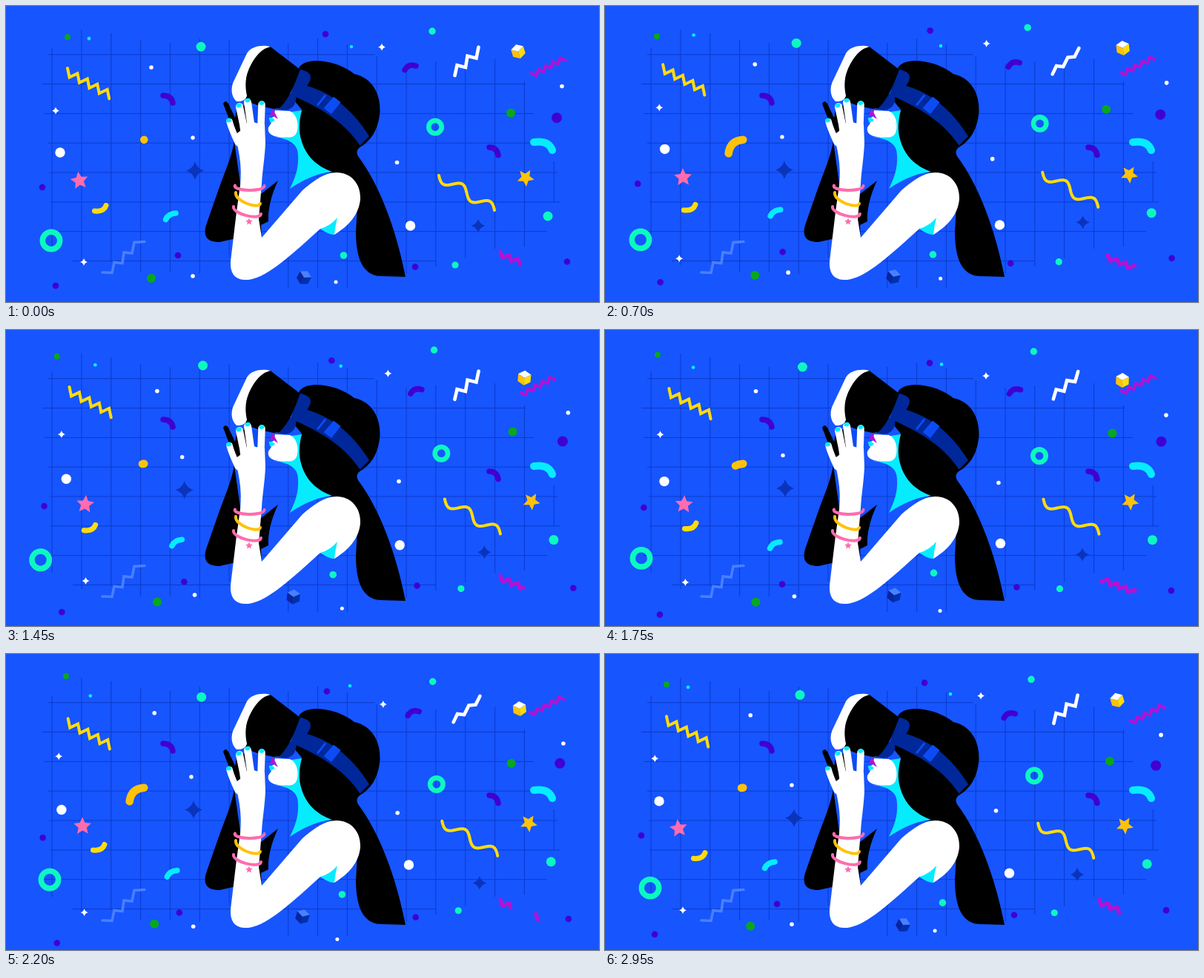
These frames come from a looping animation (800 px wide and 400 px high, 3 s). An HTML page with a canvas:

```html
<!DOCTYPE html>
<html lang="en">
<head>
<meta charset="utf-8">
<title>Headset and confetti</title>
<style>
html, body { margin: 0; width: 100%; height: 100%; overflow: hidden; background: #1755ff; }
canvas { display: block; width: 800px; height: 400px; }
</style>
</head>
<body>
<canvas id="stage" width="800" height="400"></canvas>
<script>
const ctx = document.getElementById('stage').getContext('2d');
const LOOP = 3000, STEP = 50;
const C = {
  bg: '#1755ff', line: '#0b3bcb', navy: '#00289a', deep: '#0a34bb', soft: '#4a80ff', clasp: '#0d4cf5',
  purple: '#4000cf', teal: '#0cf8c0', green: '#08a81c', cyan: '#06ecff', pink: '#ff6cae',
  yellow: '#ffdc0c', orange: '#ffc20a', magenta: '#b412d2', white: '#fff', black: '#000'
};

// Each drift: straight to the first point, a cubic curve to the last, straight home.
const DRIFT = {
  A: [[-14, -1.2], [-14.6, -4], [-12, -8.6], [-.3, -12.4]],
  B: [[-5.2, -5.2], [0, -7], [3.4, -5], [0, 4.6]],
  C: [[6.7, -4.6], [7.5, -1.8], [7.5, -.3], [3.6, -3.9]],
  D: [[8.2, -5], [8.6, -.1], [7, 6.6], [1, 13.3]]
};
const NODES = [0, 4 / 15, 2 / 3, 1];

function drift(type, t) {
  const pts = DRIFT[type];
  if (t < 750) return pts[0].map(v => v * t / 750);
  if (t > 2250) return pts[3].map(v => v * (LOOP - t) / 750);
  const u = (t - 750) / 1500;
  const w = NODES.map((a, i) =>
    NODES.reduce((p, b, j) => i === j ? p : p * (u - b) / (a - b), 1));
  return [0, 1].map(k => pts.reduce((s, p, i) => s + p[k] * w[i], 0));
}

const pulse = t => 1 - Math.abs(t % 1500 - 750) / 750;
const mix = (a, b, k) => a + (b - a) * k;

function knots(times, vals, t) {
  let i = 1;
  while (t > times[i]) i++;
  return mix(vals[i - 1], vals[i], (t - times[i - 1]) / (times[i] - times[i - 1]));
}

function fill(d, color) {
  ctx.fillStyle = color;
  ctx.fill(new Path2D(d));
}

function stroke(d, color, width, join = 'miter') {
  ctx.strokeStyle = color;
  ctx.lineWidth = width;
  ctx.lineCap = 'round';
  ctx.lineJoin = join;
  ctx.stroke(new Path2D(d));
}

function dot(x, y, r, color) {
  ctx.fillStyle = color;
  ctx.beginPath();
  ctx.arc(x, y, r, 0, 7);
  ctx.fill();
}

function ring(x, y, r, width) {
  ctx.strokeStyle = C.teal;
  ctx.lineWidth = width;
  ctx.beginPath();
  ctx.arc(x, y, r, 0, 7);
  ctx.stroke();
}

function star(x, y, r, color, turn = 0) {
  ctx.fillStyle = color;
  ctx.beginPath();
  for (let i = 0; i < 10; i++) {
    const a = turn + i * Math.PI / 5 - Math.PI / 2, q = i % 2 ? r * .47 : r;
    ctx.lineTo(x + q * Math.cos(a), y + q * Math.sin(a));
  }
  ctx.fill();
}

function spark(x, y, r, color) {
  const k = r * .24;
  fill(`M${x} ${y - r}Q${x + k} ${y - k} ${x + r} ${y}Q${x + k} ${y + k} ${x} ${y + r}` +
    `Q${x - k} ${y + k} ${x - r} ${y}Q${x - k} ${y - k} ${x} ${y - r}Z`, color);
}

function cube(x, y, turn, faces) {
  const r = 10, at = i => `${r * Math.sin(i * Math.PI / 3)} ${-r * Math.cos(i * Math.PI / 3)}`;
  ctx.save();
  ctx.translate(x, y);
  ctx.rotate(turn);
  faces.forEach((color, i) => {
    const n = 2 * i - 1;
    fill(`M0 0L${at(n)}L${at(n + 1)}L${at(n + 2)}Z`, color);
  });
  ctx.restore();
}

const polyline = pts => 'M' + pts.map(p => p.join(' ')).join('L');

function zigzag(x, y, a, b, count) {
  let d = `M${x} ${y}`;
  for (let i = 0; i < count; i++) d += 'l' + (i % 2 ? b : a).join(' ');
  return d;
}

function wave(x, y, dx, dy, amp, turns) {
  const n = 48, len = Math.hypot(dx, dy), pts = [];
  for (let i = 0; i <= n; i++) {
    const u = i / n, q = amp * Math.sin(u * turns * 2 * Math.PI) / len;
    pts.push([x + dx * u - dy * q, y + dy * u + dx * q]);
  }
  return polyline(pts);
}

const DOTS = {
  A: [[83, 42, 4, 'green'], [252, 178, 2.7, 'white'], [466, 55, 2.3, 'cyan'],
    [545.5, 297, 6.7, 'white'], [455.5, 337, 4.8, 'teal']],
  B: [[263, 55, 6.5, 'teal'], [49, 245, 4.3, 'purple'], [252, 365, 2.8, 'white'],
    [575, 34, 4.7, 'teal'], [681, 144.5, 6, 'green'], [527.5, 211.5, 2.8, 'white'],
    [552, 352.5, 4.3, 'purple']],
  C: [[196, 83, 2.8, 'white'], [196, 368, 6, 'green'], [743, 151, 7, 'purple'],
    [731, 284, 6.5, 'teal'], [606, 350, 4.6, 'teal']],
  D: [[112, 44, 2.4, 'cyan'], [73, 198, 6.7, 'white'], [232, 337, 4.3, 'purple'],
    [67, 378, 4.3, 'purple'], [431, 38, 4.3, 'purple'], [750, 108.5, 2.8, 'white'],
    [757, 345.5, 4.3, 'purple'], [445, 373, 2.5, 'white']]
};

const GROUPS = {
  A(t) {
    spark(255, 222.5, 12, C.deep);
    ring(61, 317, 11.7, 7.5);
    stroke('M119.5 277Q132 278.5 135 269.5', C.yellow, 7);
    stroke(zigzag(708.5, 91, [7, 3], [2.8, -8.2], 9), C.magenta, 4, 'round');
    cube(402, 367, .5 - .4 * pulse(t / 2), [C.soft, '#0031ad', '#0a249c']);
  },
  B() {
    stroke(zigzag(83, 84, [2.6, 12.4], [10.8, -5.2], 9), C.yellow, 4);
    spark(105, 346, 5, C.white);
  },
  C(t) {
    spark(67, 141.5, 5, C.white);
    star(99, 236, 12.5, C.pink, -.15 + .25 * pulse(t / 2));
    star(701, 232, 12, C.orange, .55);
    stroke('M538 86.5Q543 77.5 553 81', C.purple, 7.5);
    stroke(wave(584, 229, 75, 47, 7, 2), C.yellow, 4, 'round');
  },
  D(t) {
    stroke('M215.5 288.5Q219 280.5 229 280', C.cyan, 7.5);
    spark(507, 55.5, 5, C.white);
    spark(637, 297, 9.2, C.deep);
    ring(579, 163.5, 8.7, 6.6);
    cube(691, 61.5, -.3 + .4 * pulse(t / 2), [C.white, C.yellow, C.orange]);
  }
};

function grid() {
  const rows = [[57, 497], [49, 701], [52, 712], [57, 730], [59, 744], [60, 747], [51, 730], [90, 580]];
  const cols = [[56, 328], [32, 350], [37, 346], [46, 360], [50, 360], [44, 362], [46, 340], [60, 360],
    [50, 381], [44, 381], [52, 381], [68, 366], [78, 362], [75, 352], [82, 341], [72, 328], [102, 325], [210, 265]];
  const gap = 39.83;
  ctx.strokeStyle = C.line;
  ctx.lineWidth = 1;
  ctx.lineCap = 'butt';
  ctx.beginPath();
  rows.forEach(([a, b], i) => {
    const y = 65.7 + i * gap;
    ctx.moveTo(a, y);
    ctx.lineTo(b, y);
  });
  cols.forEach(([a, b], i) => {
    const x = 62.1 + i * gap;
    ctx.moveTo(x, a);
    ctx.lineTo(x, b);
  });
  ctx.stroke();
}

const SHARP = [[605.5, 94], [608.5, 80], [620, 83], [622.5, 67.5], [634.5, 70.5], [637.5, 55.5]];
const LOOSE = [[603.5, 92], [609, 81], [618, 82], [624.5, 69.5], [633.5, 68.5], [639.5, 57]];

function still(t) {
  const k = pulse(t);
  stroke('M130 360L143 360.5L146 346.5L157 347.5L159 333L170 334L173 319.5L187 318.5', C.soft, 3.5);
  stroke('M212 121Q223 121 225 131', C.purple, 7.5);
  stroke('M652 191Q662 191 664 201.5', C.purple, 7.5);
  stroke('M712 184Q732 181 737 195', C.cyan, 10);
  stroke(polyline(SHARP.map((p, i) => p.map((v, j) => mix(v, LOOSE[i][j], k)))), C.white, 4.6);

  ctx.save();
  ctx.setLineDash([32 * k + .05, 99]);
  stroke('M186.3 180.7Q167.5 182 166.5 201.5', C.orange, 10.5);
  const times = [0, 700, 1150, 1750, 2200, 2600, 2950, 3000];
  const from = knots(times, [0, .2, .9, 1.1, 1.9, 2.32, 3, 3], t);
  const to = knots(times, [.55, .9, 1.3, 1.92, 2.3, 3, 3.57, 3.55], t);
  const a = [2.6, 8.2], b = [9.3, -3.5];
  const len = 5 * Math.hypot(...a) + 4 * Math.hypot(...b);
  ctx.setLineDash([(to - from) * len, (1 - to + from) * len]);
  ctx.lineDashOffset = -(from % 1) * len;
  stroke(zigzag(667, 332, a, b, 9), C.magenta, 5, 'round');
  ctx.restore();
}

function woman() {
  // hair
  fill('M308 183C304 205 296 222 286 250L270 296C266 310 270 319 288 319L306 315L345 318' +
    'L344 296L354 291C353 275 358 255 367 236L344 254L316 240Z', C.black);
  fill('M396 82C403 74 418 73 430 75C448 78 460 84 470 92C494 97 505 118 504.5 142' +
    'C503 160 498 176 482 188C473 193 472 197 475 203C504 242 526 300 539 366L505 365' +
    'C482 364 472 342 472 305L474 270L440 226L400 210L394 160L399 140L384 122Z', C.black);

  // neck and face
  fill('M385 143L399 141C395 156 395 170 398 180C404 203 420 217 440 224C420 226 402 234 383 247' +
    'C390 232 395 220 394 202C394 188 385 180 362 177L388 176C396 168 394 152 385 143Z', C.cyan);
  fill('M363 141L383 142C392 146 395 158 393 168C391 177 386 178 374 177.5C362 177 352 174 354 164' +
    'L358 158L355 152L361 150Z', C.white);
  fill('M360 139L367 153L361 149L356 148Z', C.magenta);
  fill('M355 151Q359 150 363 154Q360 158 356 157Z', C.cyan);

  // headset and strap
  fill('M391 117C393 130 389 139 376 141L366 139L376 121Z', C.navy);
  fill('M356 54.5L397 86L386 113Q379 128 369 138L361 139L342 135L323 128L316 100L335 60Z', C.black);
  fill('M397 85.5C407 88 411 92 411 96C411 102 408 104 406.5 108C441 118 469 142 490 176' +
    'L477.5 188.5C459 160 429 139 384 120Z', C.navy);
  fill('M428.5 138L442 122.500L451.500 130L439 146Z', C.clasp);
  fill('M419 133.5L430 119.5L432.5 121L421.3 135Z', C.clasp);
  fill('M357 55C342 58 333 73 327 87C322 99 323 112 325 121C324 127 318 129.5 311 129' +
    'C303 122 303 109 308 100L325 64C331 54 346 52 357 55Z', C.white);

  // far hand
  fill('M293 132Q296 126 300 132L309 151L312 136L330 133L330 165L312 182Z', C.black);
  fill('M333 136L341 136L341 160L333 160Z', C.clasp);

  // arm
  fill('M309 174C313 192 319 213 316 242L311 278L303 345C302 365 312 371 327 370C349 367 374 347 424 301' +
    'L443 309C461 298 476 283 478 261C479 240 465 225 446 225C429 225 414 237 400 249' +
    'L345 313L341 288L345 240C346 222 349 206 350 185L349 160L337 158L328 154L317 168Z', C.white);
  fill('M424 301Q438 297 447 286Q444 298 443 309Q437 310 424 301Z', C.cyan);
  stroke('M301.5 156Q304 166 313 185', C.white, 8.5);
  stroke('M315 136L320 160L323 182', C.white, 10);
  stroke('M326 130L330 158L333 180', C.white, 10);
  stroke('M345 133L344 160L344 182', C.white, 9.5);
  for (const [x, y] of [[300.5, 154.5], [314, 134.5], [326, 127.5], [345, 131]]) {
    ctx.fillStyle = C.cyan;
    ctx.beginPath();
    ctx.ellipse(x, y, 3.6, 2.9, -.2, 0, 7);
    ctx.fill();
  }

  // bracelets
  stroke('M309 242.5C305 250 348 252 348.5 243', C.pink, 4);
  stroke('M310 252C308 264 341 275 343 267', C.orange, 4);
  stroke('M307 271C305 281 342 290 344 281', C.pink, 4);
  star(328, 291.5, 5, C.pink);
}

function draw(now) {
  const t = Math.floor(now % LOOP / STEP) * STEP;
  ctx.fillStyle = C.bg;
  ctx.fillRect(0, 0, 800, 400);
  grid();
  still(t);
  for (const type in GROUPS) {
    ctx.save();
    ctx.translate(...drift(type, t));
    GROUPS[type](t);
    for (const [x, y, r, color] of DOTS[type]) dot(x, y, r, C[color]);
    ctx.restore();
  }
  woman();
}

const start = performance.now();
function tick() {
  draw(performance.now() - start);
  requestAnimationFrame(tick);
}
tick();
</script>
</body>
</html>
```
